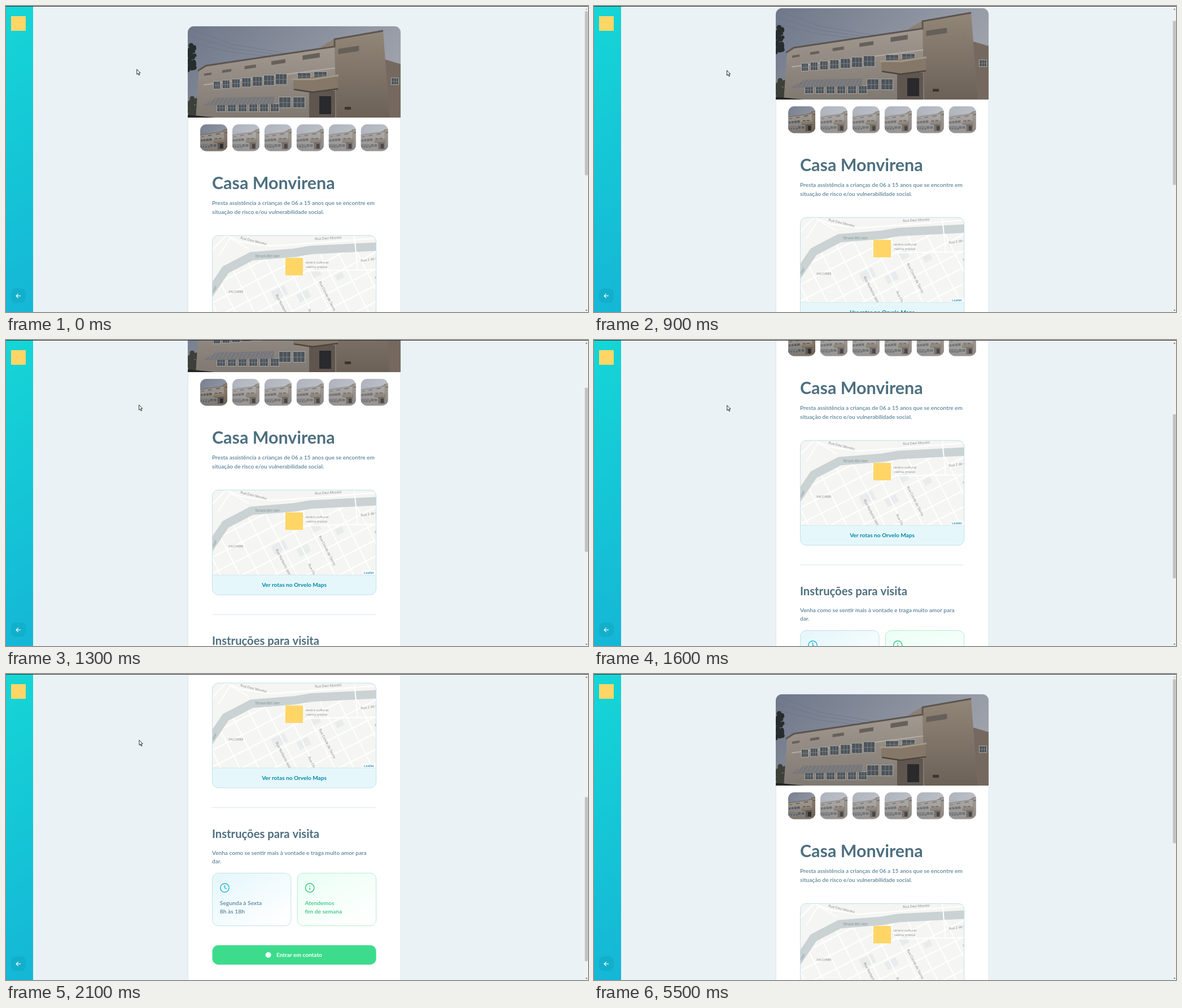
An HTML page with a canvas for the animation above (5.6 s loop, 1031 by 543 pixels).

```html
<!DOCTYPE html>
<html lang="pt">
<head>
<meta charset="utf-8">
<title>Visita</title>
<style>
html, body { margin: 0; width: 100%; height: 100%; overflow: hidden; background: #ebf2f5; }
canvas { display: block; }
</style>
</head>
<body>
<canvas id="stage" width="1031" height="543"></canvas>
<script>
const ctx = document.getElementById('stage').getContext('2d');
const LOOP = 5600, STEP = 100, RESET = 5500, SETTLED = 2500;
const SCROLL_KEYS = [[600, 0], [900, 32], [1300, 141], [1600, 229], [1900, 335], [2400, 440.5]];
const UI = 'Lato, sans-serif', MAP = '"Open Sans", sans-serif';
const SLATE = '#4d6f80', BODY = '#5c8599', YELLOW = '#ffd666', BLUE = '#2ab5d1', GREEN = '#37c77f';
const LEFT = 365.5, WIDTH = 290.2, RADIUS = 10.7;

function trace(points) {
  ctx.beginPath();
  for (let i = 0; i < points.length; i += 2) ctx.lineTo(points[i], points[i + 1]);
}

function poly(color, ...points) {
  trace(points);
  ctx.closePath();
  ctx.fillStyle = color;
  ctx.fill();
}

function line(color, width, ...points) {
  trace(points);
  ctx.strokeStyle = color;
  ctx.lineWidth = width;
  ctx.stroke();
}

function rect(color, x, y, w, h) {
  ctx.fillStyle = color;
  ctx.fillRect(x, y, w, h);
}

function box(x, y, w, h, r, fill, stroke) {
  ctx.beginPath();
  ctx.roundRect(x, y, w, h, r);
  if (fill) { ctx.fillStyle = fill; ctx.fill(); }
  if (stroke) { ctx.strokeStyle = stroke; ctx.lineWidth = 0.8; ctx.stroke(); }
}

function circle(x, y, r, fill, stroke) {
  ctx.beginPath();
  ctx.arc(x, y, r, 0, Math.PI * 2);
  if (fill) { ctx.fillStyle = fill; ctx.fill(); }
  if (stroke) { ctx.strokeStyle = stroke; ctx.lineWidth = 1.5; ctx.stroke(); }
}

function text(str, x, y, font, color, align = 'left', degrees = 0) {
  ctx.save();
  ctx.translate(x, y);
  ctx.rotate(degrees * Math.PI / 180);
  ctx.font = font;
  ctx.fillStyle = color;
  ctx.textAlign = align;
  ctx.fillText(str, 0, 0);
  ctx.restore();
}

// Same geometry as a CSS linear-gradient with an angle.
function gradient(x, y, w, h, degrees, from, to, inset = 0) {
  const a = degrees * Math.PI / 180, dx = Math.sin(a), dy = -Math.cos(a);
  const half = (Math.abs(w * dx) + Math.abs(h * dy)) / 2, cx = x + w / 2, cy = y + h / 2;
  const g = ctx.createLinearGradient(cx - dx * half, cy - dy * half, cx + dx * half, cy + dy * half);
  g.addColorStop(inset, from);
  g.addColorStop(1 - inset, to);
  return g;
}

function clipped(x, y, w, h, r, draw) {
  ctx.save();
  ctx.beginPath();
  ctx.roundRect(x, y, w, h, r);
  ctx.clip();
  draw();
  ctx.restore();
}

function foliage(cx, cy, rx, ry, color) {
  let seed = 7;
  const rnd = () => (seed = seed * 16807 % 2147483647) / 2147483647 * 2 - 1;
  for (let i = 0; i < 40; i++) circle(cx + rnd() * rx, cy + rnd() * ry, 2 + Math.abs(rnd()) * 3, color);
}

function pane(x, y, w, h) {
  rect('#a9a7a3', x - 1, y - 1, w + 2, h + 2);
  rect('#4c545b', x, y, w, h);
  for (let i = 1; i < 3; i++) rect('#8b8f91', x + w * i / 3, y, 0.7, h);
  rect('#8b8f91', x, y + h / 2, w, 0.7);
}

function photo() {
  const shade = (from, to) => gradient(322, 40, 377, 158, 180, from, to);
  rect(gradient(322, 36, 377, 100, 130, '#6f788a', '#a2a5ae'), 322, 0, 377, 230);
  for (let i = 0; i < 3; i++) line('#687181', 0.6, 322, 38 + i * 13, 400, 68 + i * 7, 545, 92 + i * 3);
  foliage(328, 92, 7, 22, '#272c2d');
  foliage(330, 182, 9, 18, '#3d4038');

  poly('#75695f', 672, 95, 699, 103, 699, 230, 672, 230);
  poly(shade('#aaa298', '#807972'), 334, 230, 342, 113, 354, 106, 586, 71, 586, 230);
  poly(shade('#938779', '#6c6157'), 556, 73, 582, 58, 668, 44, 682, 230, 586, 230, 582, 73);
  line('#5c5550', 3, 340, 115, 354, 106, 582, 72, 582, 59, 668, 44);
  line('#b3aca2', 2, 350, 140, 583, 110);

  for (let i = 0; i < 6; i++) {
    const d = 28 * i + 3.9 * i * i, w = 13 + d * 0.1, h = 4 + d * 0.023;
    const x = 351 + d, y = 118 - d * 0.2;
    poly('#66605a', x, y + w * 0.15, x + w, y, x + w, y + h, x, y + h + w * 0.15);
  }
  for (let i = 0; i < 7; i++) {
    const d = 15.3 * i + 0.5 * i * i;
    pane(368 + d, 134 - d * 0.12, 11 + d * 0.075, 13 + d * 0.045);
  }
  for (let i = 0; i < 2; i++) {
    pane(517 + i * 29, 119 - i * 2, 22, 11);
    pane(484 + i * 25, 162, 20, 18);
  }
  pane(683, 128, 12, 11);

  for (let x = 374; x < 470; x += 19) pane(x, 174, 14, 13);
  poly('#77777a', 349, 177, 372, 163, 475, 161, 475, 174);
  for (let x = 360; x < 474; x += 7) line('#8f8f8f', 0.8, x + 7, 163, x, 175);

  rect('#5f564f', 537, 150, 46, 48);
  rect('#2a292c', 555, 160, 21, 32);
  poly('#857868', 509, 130, 588, 122, 588, 146, 543, 152, 509, 147);
  line('#a4988a', 3, 507, 130, 545, 130, 589, 123);
  line('#4c443e', 2.5, 510, 148, 543, 153, 588, 147);
  rect('#3b3532', 600, 179, 11, 5);
  poly('#262525', 322, 193, 430, 204, 500, 230, 322, 230);
}

function thumb(i) {
  const x = 344 + i * 56.95, y = 210, size = 48;
  clipped(x, y, size, size - 0.6, RADIUS, () => {
    ctx.globalAlpha = i ? 0.6 : 1;
    ctx.translate(x + size / 2, y + size / 2);
    ctx.scale(0.25, 0.25);
    ctx.translate(-510.5, -117);
    photo();
  });
}

// Two families of streets, laid out on a rotated grid south of the river.
function streets(river) {
  ctx.save();
  trace([...river, 658, 560, 358, 560]);
  ctx.clip();
  ctx.translate(510, 482);
  ctx.rotate(-27 * Math.PI / 180);
  for (let i = 0; i < 4; i++) rect('#e9ecec', -48 + i * 38, 4 + (i % 2) * 25, 26 - i * 4, 17 - i * 2);
  for (let i = -6; i < 6; i++) {
    line('#ffffff', 2, i * 30, -60, i * 30, 170);
    line('#ffffff', 2.2, -200, i * 26, 220, i * 26);
  }
  ctx.restore();
}

function map() {
  const label = (str, x, y, angle = 0, align = 'left') =>
    text(str, x, y, '6.1px ' + MAP, '#858585', align, angle);
  const waterLabel = (str, x, y, angle = 0) =>
    text(str, x, y, 'italic 6.2px ' + MAP, '#819396', 'center', angle);
  const river = [358, 514, 389, 468, 435, 444, 510, 438, 540, 433, 658, 427];

  rect('#f5f5f3', 365, 407, 291, 151);
  ctx.lineJoin = 'round';
  streets(river);
  line('#ffffff', 2.2, 365, 433, 390, 407, 418, 419, 470, 426, 540, 421, 656, 412);
  line('#ffffff', 1.8, 376, 445, 397, 412, 430, 431);
  line('#cad2d3', 15, ...river);
  line('#ffffff', 2, 617, 407, 623, 469);
  line('#ffffff', 2, 530, 470, 656, 468);

  label('Rua Davi Morelvi', 415, 413, 14);
  label('Rua Davi Morelvi', 571, 414, -3, 'center');
  label('Rua 2 de n', 628.5, 454, -8);
  label('S', 653, 484);
  waterLabel('Taruvá-Mel river', 463, 445.5);
  waterLabel('river', 371, 503, -62);
  label('centro cultural', 550.5, 457.3, 0, 'center');
  label('nelma trovick', 550.5, 465.3, 0, 'center');
  label('FACORBE', 407.5, 509, 0, 'center');
  label('Rua Norberto Velmar', 477.5, 513, 63);
  label('Rua Conde de Tavins', 554, 489.5, 63);
  label('Rua Ols', 535, 539, 63);

  rect('rgba(255,255,255,.75)', 631.5, 549.5, 25, 8.5);
  text('Leaflet', 634, 556, '5.9px "Liberation Sans", sans-serif', '#0078a8');
  rect(YELLOW, 495, 447, 31, 31);
}

function infoCard(x, tint, border, color, angle, lines) {
  const y = 744.5, w = 139.5, h = 93.5;
  box(x, y, w, h, RADIUS, gradient(x, y, w, h, angle, tint, '#ffffff', 0.08), border);
  lines.forEach((str, i) => text(str, x + 13.3, 801.3 + i * 15, '600 10.3px ' + UI, color));
}

function page() {
  const body = '600 10.1px ' + UI, action = '700 10.1px ' + UI;
  box(322.3, 36.3, 376.8, 913.7, RADIUS, '#ffffff', '#d3e2e5');
  clipped(322, 36, 377, 162, [RADIUS, RADIUS, 0, 0], photo);
  for (let i = 0; i < 6; i++) thumb(i);

  text('Casa Monvirena', 365, 325, '700 30.4px ' + UI, SLATE);
  text('Presta assistência a crianças de 06 a 15 anos que se encontre em', 365, 353.4, body, BODY);
  text('situação de risco e/ou vulnerabilidade social.', 365, 368.5, body, BODY);

  clipped(LEFT, 407.2, WIDTH, 186, RADIUS, () => {
    rect('#e6f7fb', 365, 407, 291, 187);
    clipped(365, 407, 291, 151, 0, map);
    rect('#b3dae2', 365, 557.8, 291, 0.5);
  });
  box(LEFT, 407.2, WIDTH, 186, RADIUS, null, '#b3dae2');
  text('Ver rotas no Orvelo Maps', 510.5, 579, action, '#0089a5', 'center');
  rect('#d3e2e5', LEFT, 627.7, WIDTH, 0.9);

  text('Instruções para visita', 365, 681.7, '700 20.2px ' + UI, SLATE);
  text('Venha como se sentir mais à vontade e traga muito amor para', 365, 712, body, BODY);
  text('dar.', 365, 727.3, body, BODY);

  infoCard(LEFT, '#e6f7fb', '#b3dae2', BODY, 150, ['Segunda à Sexta', '8h às 18h']);
  infoCard(516.2, '#ecfff6', '#a1e9c5', GREEN, 154, ['Atendemos', 'fim de semana']);
  circle(387.5, 770.7, 7.7, null, BLUE);
  line(BLUE, 1.4, 387.5, 765.8, 387.5, 770.7, 390.8, 772.5);
  circle(538.2, 770.7, 7.7, null, GREEN);
  line(GREEN, 1.5, 538.2, 770.2, 538.2, 774.3);
  rect(GREEN, 537.4, 766.8, 1.6, 1.6);

  box(LEFT, 872.5, WIDTH, 34.3, RADIUS, '#3cdc8c');
  circle(464.6, 889.7, 5, '#ffffff');
  text('Entrar em contato', 479, 893.3, action, '#ffffff');
}

function sidebar() {
  rect(gradient(0, 1, 48, 542, 329.54, '#15b6d6', '#15d6d6'), 0, 1, 48, 542);
  rect(YELLOW, 9, 18, 26, 26);
  box(9, 501, 26, 26, 8.6, '#12afcb');
  line('#ffffff', 1.2, 26, 514.4, 18, 514.4);
  line('#ffffff', 1.2, 21.8, 510.6, 18, 514.4, 21.8, 518.2);
}

function scrollbar(scroll) {
  const arrow = (y, dir, active) =>
    poly(active ? '#505050' : '#a3a3a3', 1026.5, y, 1028.2, y + 2 * dir, 1030, y);
  rect('#f1f1f1', 1025, 1, 6, 542);
  rect('#c1c1c1', 1025.5, 9.3 + scroll * 0.535, 5.2, 291);
  arrow(6.5, -1, scroll > 0);
  arrow(539.3, 1, scroll < 440);
}

function pointerAt(t, scroll) {
  if (t < 200) return [231.8, 112.3];
  if (t >= SETTLED) return [236.7, 119.3];
  return [235.4 + scroll * 0.0015, 114 + scroll * 0.0085];
}

function pointer(t, scroll) {
  if (t >= RESET) return;
  ctx.save();
  ctx.translate(...pointerAt(t, scroll));
  poly('#ffffff', 0, 0, 0, 9, 2.1, 7.2, 3.6, 10.6, 5, 10, 3.6, 6.6, 6.2, 6.4);
  ctx.strokeStyle = '#111111';
  ctx.lineWidth = 0.9;
  ctx.stroke();
  ctx.restore();
}

// Smooth cubic through the keys, at rest at both ends.
function scrollAt(t) {
  const keys = SCROLL_KEYS, last = keys.length - 1;
  if (t <= keys[0][0] || t >= RESET) return 0;
  if (t >= keys[last][0]) return keys[last][1];
  const i = keys.findIndex(k => k[0] > t) - 1;
  const slope = k => k === 0 || k === last ? 0
    : (keys[k + 1][1] - keys[k - 1][1]) / (keys[k + 1][0] - keys[k - 1][0]);
  const [t0, y0] = keys[i], [t1, y1] = keys[i + 1], span = t1 - t0, u = (t - t0) / span;
  return y0 + (y1 - y0) * u * u * (3 - 2 * u)
    + span * u * (1 - u) * (slope(i) * (1 - u) - slope(i + 1) * u);
}

function render(t) {
  const scroll = scrollAt(t);
  rect('#ebf2f5', 0, 0, 1031, 543);
  ctx.save();
  ctx.translate(0, -scroll);
  page();
  ctx.restore();
  sidebar();
  scrollbar(scroll);
  rect('#2b2d30', 0, 0, 1031, 1);
  pointer(t, scroll);
}

let shown = -1;
const start = performance.now();
function tick() {
  const t = Math.floor((performance.now() - start) % LOOP / STEP) * STEP;
  if (t !== shown) render(shown = t);
  requestAnimationFrame(tick);
}
tick();
</script>
</body>
</html>
```
